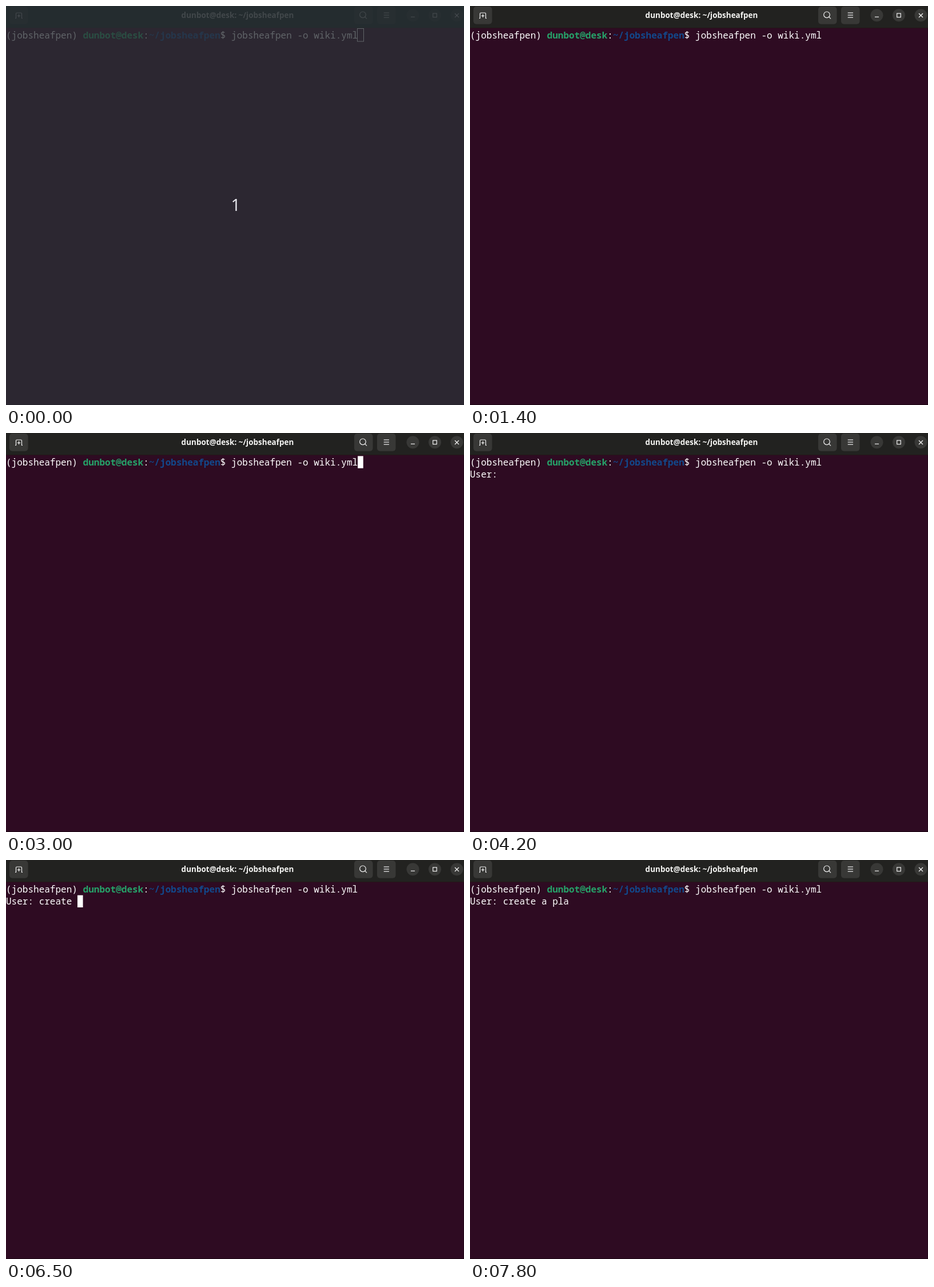
Write an HTML page with a canvas that moves like this. It is 801 px wide and 699 px high and loops after 8000 ms.

```html
<!DOCTYPE html>
<html lang="en">
<head>
<meta charset="utf-8">
<title>Terminal</title>
<style>
html, body { margin: 0; width: 100%; height: 100%; overflow: hidden; background: #2e0b22; }
canvas { display: block; }
</style>
</head>
<body>
<canvas id="stage" width="801" height="699"></canvas>
<script>
const W = 801, H = 699, LOOP = 8000;
const ctx = document.getElementById('stage').getContext('2d');

const CELL = 9.612, ROW = 21.3, TOP = 40.4;
const MONO = '16.02px "Noto Sans Mono", "DejaVu Sans Mono", monospace';
const SANS = '"Open Sans", "Noto Sans", sans-serif';
const USER = 'dunbot@desk', APP = 'jobsheafpen';
const COMMAND = [
  [`(${APP}) `, '#fff'],
  [USER, '#26a269', true],
  [':', '#fff'],
  [`~/${APP}`, '#12488b', true],
  [`$ ${APP} -o wiki.yml`, '#fff']
];
const COMMAND_COLS = COMMAND.reduce((n, [s]) => n + s.length, 0);
const ANSWER = 'create a pla';
const KEYS = [5200, 5500, 5600, 5900, 6100, 6200, 6500, 6700, 6800, 7100, 7200, 7300];

const REFOCUS = 1300;  // window and veil change tint
const CLEAR = 1400;    // countdown veil is gone
const ENTER = 3600;
const PROMPT = 4200;

function box(x, y, w, h, color) {
  ctx.fillStyle = color;
  ctx.fillRect(x, y, w, h);
}

function print(text, col, row, color, bold) {
  ctx.font = (bold ? 'bold ' : '') + MONO;
  ctx.textAlign = 'left';
  ctx.fillStyle = color;
  ctx.fillText(text, col * CELL, 57 + row * 21);
}

function cursor(col, row) {
  box(col * CELL, TOP + row * ROW, CELL, ROW, '#fff');
}

function line(...points) {
  ctx.beginPath();
  points.forEach(([x, y], i) => i ? ctx.lineTo(x, y) : ctx.moveTo(x, y));
  ctx.stroke();
}

function disc(x, y, r) {
  ctx.beginPath();
  ctx.arc(x, y, r, 0, Math.PI * 2);
}

function buttons() {
  ctx.fillStyle = '#383836';
  for (const x of [6, 609, 649]) {
    ctx.beginPath();
    ctx.roundRect(x, 1, 32.5, 30.7, 5);
    ctx.fill();
  }
  for (const x of [711.5, 750, 788.5]) {
    disc(x, 16.3, 11);
    ctx.fill();
  }
}

function tabIcon() {
  ctx.beginPath();
  ctx.moveTo(16, 21.5);
  ctx.lineTo(17.5, 21.5);
  ctx.arcTo(17.5, 12, 22, 12, 1.5);
  ctx.arcTo(27.5, 12, 27.5, 21.5, 1.5);
  ctx.lineTo(27.5, 21.5);
  ctx.lineTo(29, 21.5);
  ctx.stroke();
  line([22.5, 14.5], [22.5, 20]);
  line([19.8, 17.2], [25.2, 17.2]);
}

function icons() {
  ctx.strokeStyle = '#f2f2f2';
  ctx.lineWidth = 1.2;
  tabIcon();
  disc(624, 15.3, 5.3);
  ctx.stroke();
  line([627.8, 19.1], [631, 22.3]);
  for (const y of [12, 16, 20]) line([660.7, y], [670, y]);
  line([708, 19.2], [715, 19.2]);
  ctx.strokeRect(746.7, 13, 6.6, 6.6);
  line([785, 13], [792, 20]);
  line([792, 13], [785, 20]);
}

function header(t) {
  const veiled = t < REFOCUS;
  const focus = Math.max(0, Math.min(1, (Math.floor(t / 100) - 4) / 3));
  box(0, 0, W, 38, veiled ? '#10201c' : '#222220');
  box(0, 38, W, 1, '#241518');
  ctx.globalAlpha = veiled ? 0.3 + 0.5 * focus : 1;
  buttons();
  ctx.globalAlpha = 0.5 + 0.5 * focus;
  icons();
  ctx.font = `bold 13.5px ${SANS}`;
  ctx.textAlign = 'center';
  ctx.fillStyle = '#f4f4f2';
  ctx.fillText(`${USER}: ~/${APP}`, 405, 21);
  ctx.globalAlpha = 1;
}

function terminal(t) {
  let col = 0;
  for (const [text, color, bold] of COMMAND) {
    print(text, col, 0, color, bold);
    col += text.length;
  }
  if (t < 500) {
    ctx.strokeStyle = '#fff';
    ctx.lineWidth = 1;
    ctx.strokeRect(614.5, 39.5, 11, 22.5);
  } else if (t < REFOCUS || (t >= 1800 && t < 2400) || (t >= 3000 && t < ENTER)) {
    cursor(COMMAND_COLS, 0);
  }
  if (t >= ENTER && t < 4100) cursor(0, 1);
  if (t >= PROMPT) {
    const typed = KEYS.filter(k => k <= t).length;
    print('User: ' + ANSWER.slice(0, typed), 0, 1, '#fff');
    if (t >= 4700 && t < 7800) cursor(6 + typed, 1);
  }
}

function countdown(t) {
  box(0, 0, W, H, t < REFOCUS ? 'rgba(43,48,54,.75)' : 'rgba(39,47,51,.75)');
  ctx.font = `29px ${SANS}`;
  ctx.textAlign = 'left';
  ctx.fillStyle = '#eeeef4';
  ctx.fillText('1', 393.5, 359);
}

function draw(t) {
  box(0, 0, W, H, '#2e0b22');
  header(t);
  terminal(t);
  box(0, H - 1, W, 1, 'rgba(0,0,0,.4)');
  box(W - 1, 39, 1, H - 39, 'rgba(0,0,0,.25)');
  if (t < CLEAR) countdown(t);
}

const start = performance.now();
function tick() {
  draw((performance.now() - start) % LOOP);
  requestAnimationFrame(tick);
}
tick();
</script>
</body>
</html>
```
